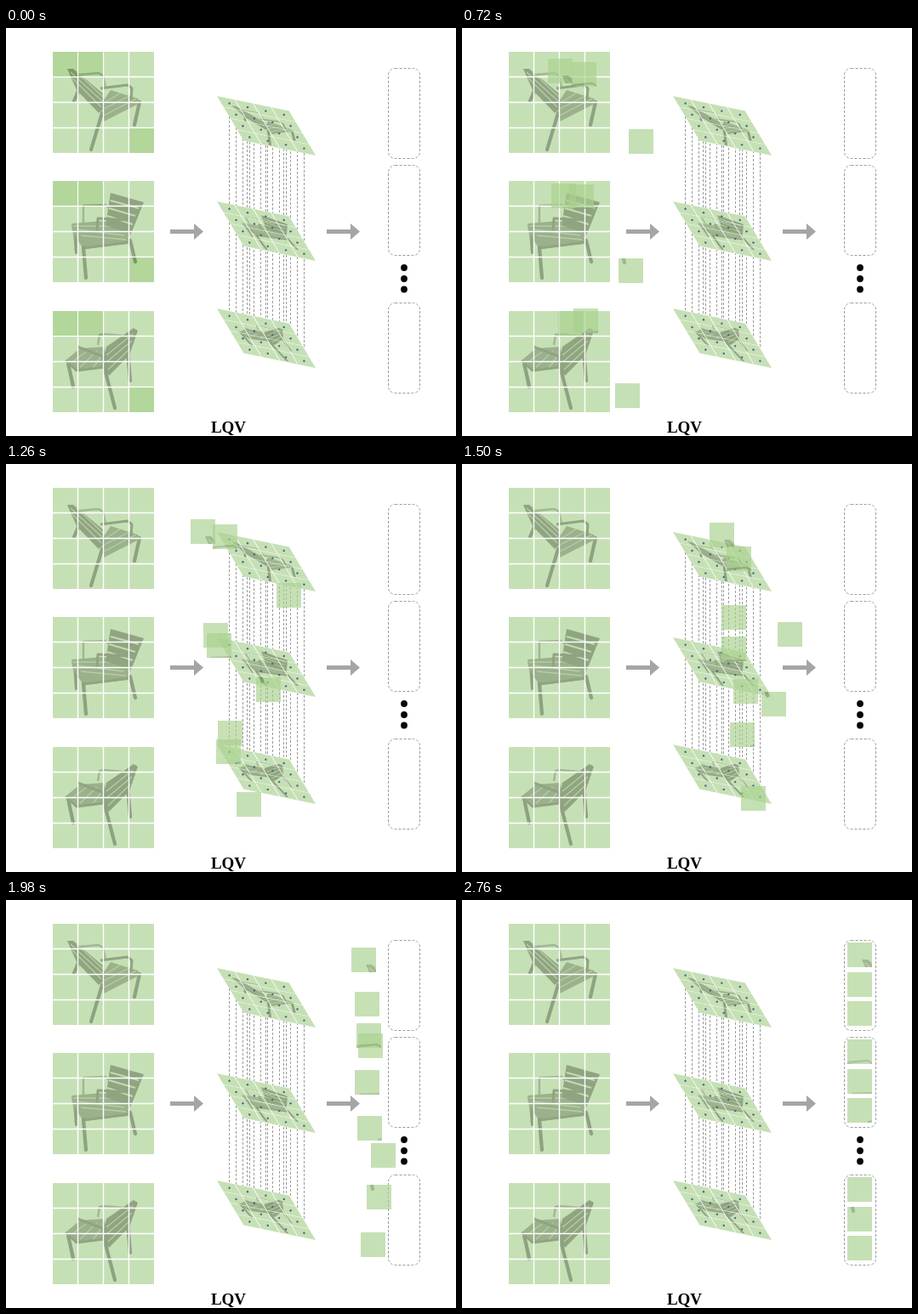
These frames come from a looping animation (529x480 px, 2.82 s). An HTML page:

```html
<!DOCTYPE html>
<html lang="en">
<head>
<meta charset="utf-8">
<title>Token grouping</title>
<style>
  html, body { margin: 0; width: 100%; height: 100%; overflow: hidden; background: #fff; }
  svg { display: block; }
  .back { fill: #55743f; }
  .seat { fill: #66884f; }
  .slats { fill: none; stroke: #8fb474; stroke-width: 1.3; }
  .gaps { fill: none; stroke: #a0c885; stroke-width: 2.2; }
  .arm { fill: none; stroke: #55753f; stroke-width: 3; stroke-linejoin: round; }
  .far { fill: none; stroke: #6f9058; stroke-width: 2.4; stroke-linejoin: round; }
  .leg { fill: none; stroke: #527040; stroke-width: 4.2; stroke-linecap: round; }
  .dash { fill: none; stroke: #9c9c9c; stroke-dasharray: 3 2; }
</style>
</head>
<body>
<svg id="stage" width="529" height="480" viewBox="0 0 529 480">
  <defs>
    <g id="chair0">
      <path class="leg" d="M30 46L25 58M102 59L96 86"/>
      <path class="far" d="M24 31L30 27 54 25 59 28 62 42"/>
      <path class="seat" d="M58 60L68 45 100 55 103 60 60 82Z"/>
      <path class="slats" d="M60 75L98 55M60 67L90 52M61 60L80 48"/>
      <path class="back" d="M17 20L24 20 60 50 61 66 54 72 28 45Z"/>
      <path class="slats" d="M21 24L58 58M23 31L57 65M28 24L60 54"/>
      <path class="arm" d="M56 43L88 39 93 43 92 57"/>
      <path class="leg" d="M58 72L45 115"/>
    </g>
    <g id="chair1">
      <path class="leg" d="M26 57L28 84M91 70L97 95"/>
      <path class="far" d="M36 52L36 29 62 28 68 34"/>
      <path class="seat" d="M22 50L60 47 91 62 88 74 36 80 23 60Z"/>
      <path class="slats" d="M28 57L84 64M24 53L74 53M33 64L86 69"/>
      <path class="back" d="M68 14L107 25 92 62 62 52Z"/>
      <path class="gaps" d="M68 23L101 32M66 32L97 41M64 41L94 51"/>
      <path class="arm" d="M52 60L53 44 88 46M36 79L90 72"/>
      <path class="leg" d="M36 78L39 114"/>
    </g>
    <g id="chair2">
      <path class="leg" d="M18 61L24 89M88 47L91 82"/>
      <path class="far" d="M53 40L55 28 60 27 82 29"/>
      <path class="seat" d="M15 58L32 44 60 42 66 66 26 70Z"/>
      <path class="slats" d="M22 60L42 46M32 66L52 47M46 68L58 52"/>
      <path class="back" d="M95 20L100 23 90 52 66 76 57 66 63 42Z"/>
      <path class="slats" d="M94 27L63 52M93 35L62 61M91 44L65 69"/>
      <path class="arm" d="M29 42L58 53 64 64M15 58L28 70 60 66"/>
      <path class="leg" d="M61 68L73 114"/>
    </g>
    <path id="grid" stroke="#fff" stroke-width="1.4"
      d="M29.5 0V119M59.5 0V119M89.5 0V119M0 29.5H119M0 59.5H119M0 89.5H119"/>
    <path id="arrow" fill="#a5a5a5" d="M0 -2.5H28V-9.5L39 0 28 9.5V2.5H0Z"/>
  </defs>
</svg>
<script>
const stage = document.getElementById('stage');
const LOOP = 2820, STEP = 60, CELL = 29;
const GREEN = '#a9d18e';
const range = n => [...Array(n).keys()];

const pictureTops = [28, 180, 333];
const planeTops = [80, 204, 330];
const slotTops = [47.5, 161.5, 323.5];
const cells = [[0, 0], [30, 0], [90, 90]];

// Places passed at the way times, per slot group and picture
const wayTimes = [0, 960, 1500, 1980, LOOP];
const routes = [
  [[[144, 48], [291, 69], [406, 56]],
   [[153, 188], [305, 166], [410, 108]],
   [[167, 328], [319, 253], [414, 157]]],
  [[[172, 51], [311, 97], [412, 145]],
   [[167, 190], [305, 203], [410, 200]],
   [[175, 330], [315, 304], [413, 254]]],
  [[[245, 121], [371, 186], [429, 286]],
   [[225, 262], [352, 268], [424, 335]],
   [[214, 406], [328, 379], [417, 391]]]
];

const picture = i => `<g opacity=".65"><rect width="119" height="119" fill="${GREEN}"/>
  <use href="#chair${i}"/><use href="#grid"/></g>`;

const planePoint = (col, row, top) => {
  const x = 15 + 30 * col, y = 15 + 30 * row;
  return [248 + .712 * x + .2635 * y, top + .147 * x + .441 * y];
};
const centres = range(16).map(n => [n % 4, n >> 2]);

const links = centres.map(([c, r]) => {
  const [x, y1] = planePoint(c, r, planeTops[0]);
  const y2 = planePoint(c, r, planeTops[2])[1];
  return `<path class="dash" d="M${Math.floor(x) + .5} ${Math.round(y1)}V${y2}"/>`;
}).join('');

const plane = (top, i) => `
  <g transform="matrix(.712 .147 .2635 .441 248 ${top})">
    <rect width="119" height="119" fill="#fff"/>${picture(i)}
  </g>` + centres.map(([c, r]) => {
    const [x, y] = planePoint(c, r, top);
    return `<circle cx="${x}" cy="${y}" r="1.2" fill="#47688a"/>`;
  }).join('');

const slot = top => `<rect class="dash" x="449.5" y="${top}" width="37" height="106" rx="8"/>`;

const tile = (i, [x, y]) => `<g class="tile" opacity=".65">
  <rect width="${CELL}" height="${CELL}" fill="${GREEN}"/>
  <svg width="${CELL}" height="${CELL}" viewBox="${x} ${y} ${CELL} ${CELL}"><use href="#chair${i}" opacity=".65"/></svg></g>`;

stage.insertAdjacentHTML('beforeend',
  pictureTops.map((top, i) => `<g transform="translate(55 ${top})">${picture(i)}</g>`).join('') +
  links + planeTops.map(plane).join('') +
  '<use href="#arrow" x="193" y="239.5"/><use href="#arrow" x="377" y="239.5"/>' +
  slotTops.map(slot).join('') +
  [282, 295, 307.5].map(y => `<circle cx="468" cy="${y}" r="3.9" fill="#05070d"/>`).join('') +
  `<text x="261.5" y="476" text-anchor="middle" font-family="'Liberation Serif', serif"
    font-size="19" font-weight="bold">LQV</text>` +
  cells.map(cell => pictureTops.map((_, i) => tile(i, cell)).join('')).join(''));

// Constant acceleration to the midpoint, then constant braking
function ease(time) {
  const p = Math.min(1, Math.max(0, (time - 170) / 2380));
  return p < .5 ? 2 * p * p : 1 - 2 * (1 - p) ** 2;
}

const knots = wayTimes.map(ease);

// Weight of each way point for a smooth curve through all of them
const weights = u => knots.map((k, i) =>
  knots.reduce((w, other, j) => i === j ? w : w * (u - other) / (k - other), 1));

const tiles = [...document.querySelectorAll('.tile')].map((node, n) => {
  const group = Math.floor(n / 3), i = n % 3;
  const [x, y] = cells[group];
  const start = [55 + x, pictureTops[i] + y];
  const end = [453, slotTops[group] + 2.5 + 34.6 * i];
  return { node, points: [start, ...routes[group][i], end] };
});

function draw(now) {
  const time = Math.floor(now % LOOP / STEP) * STEP;
  const w = weights(ease(time));
  for (const { node, points } of tiles) {
    const at = axis => Math.round(points.reduce((sum, p, i) => sum + p[axis] * w[i], 0));
    node.setAttribute('transform', `translate(${at(0)} ${at(1)})`);
  }
}

let begin;
function frame(now) {
  begin ??= now;
  draw(now - begin);
  requestAnimationFrame(frame);
}
draw(0);
requestAnimationFrame(frame);
</script>
</body>
</html>
```
